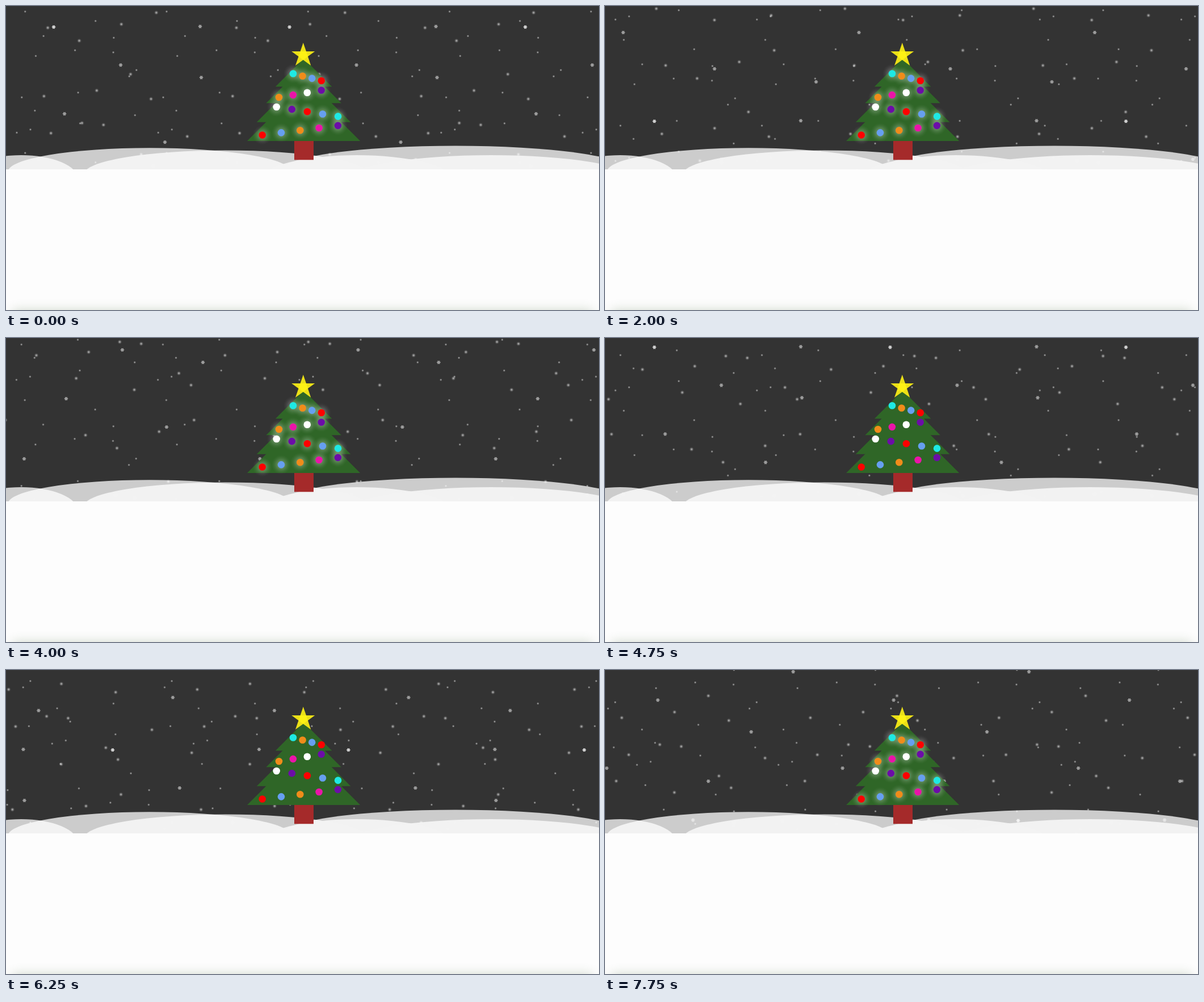
Recreate the animation shown at these times as an HTML page with a canvas. Size 1045 by 536 pixels, loop 8 s.

```html
<!DOCTYPE html>
<html lang="en">
<head>
<meta charset="utf-8">
<title>Snowy tree</title>
<style>
  html, body { margin: 0; width: 100%; height: 100%; overflow: hidden; background: #fdfdfd; }
  canvas { display: block; }
</style>
</head>
<body>
<canvas id="stage" width="1045" height="536"></canvas>
<script>
const ctx = document.getElementById('stage').getContext('2d');
const WIDTH = 1045, HEIGHT = 536, GROUND = 288;
const LOOP = 8000, STEP = 250, CYCLE = 10, START = 4.965;
const UNIT = 0.831; // stage pixels per design pixel
const TAU = Math.PI * 2;

const mod = (a, n) => ((a % n) + n) % n;

function seeded(seed) {
  return () => {
    seed = (seed + 0x6d2b79f5) | 0;
    let t = Math.imul(seed ^ (seed >>> 15), 1 | seed);
    t = (t + Math.imul(t ^ (t >>> 7), 61 | t)) ^ t;
    return ((t ^ (t >>> 14)) >>> 0) / 4294967296;
  };
}

// One flake at a random place in every cell of a grid over the tile
function scatter(seed, tile, grid) {
  const random = seeded(seed), cell = tile / grid;
  return Array.from({ length: grid * grid }, (_, i) =>
    [(i % grid + random()) * cell, (Math.floor(i / grid) + random()) * cell]);
}

// A layer repeats a square tile; "turn" and "end" are its offsets at half and full cycle.
function layer(size, turn, end, draw, flakes) {
  const tile = size * UNIT, scale = v => v * UNIT;
  return { tile, turn: turn.map(scale), end: end.map(scale), draw,
           flakes: flakes || scatter(size, tile, 4) };
}

const brightFlakes = [[87, 40], [345, 39], [205, 107], [347, 129], [106, 193],
                      [283, 243], [32, 299], [193, 363], [372, 386]];
const layers = [
  layer(300, [-100, 150], [-100, 300], smallFlake),
  layer(400, [100, 200], [200, 400], softFlake),
  layer(500, [500, 500], [500, 1000], largeFlake, brightFlakes)
];

// Centre x, top y, horizontal radius
const hills = [
  [27, 263, 99.7], [253, 250.3, 249.3], [387, 254.5, 249.3],
  [792, 246.5, 302], [618, 263, 166], [855, 263, 249.3]
];

const cyan = '#1ee9e4', orange = '#f08c1a', blue = '#669ff0', red = '#ff0000',
      pink = '#ea14a8', white = '#ffffff', purple = '#6c0da8';

// Strings of baubles along straight lines
const garland = (x, y, dx, dy, colors) =>
  colors.map((color, i) => [x + i * dx, y + i * dy, color]);
const baubles = [
  ...garland(506, 119.3, 16.6, 4.15, [cyan, orange, blue, red]),
  ...garland(481, 161, 24.9, -4.15, [orange, pink, white, purple]),
  ...garland(476.7, 178, 27.1, 4.15, [white, purple, red, blue, cyan]),
  ...garland(451.7, 227.5, 33.3, -4.15, [red, blue, orange, pink, purple])
];

function disc(x, y, r, fill) {
  ctx.fillStyle = fill;
  ctx.beginPath();
  ctx.arc(x, y, r, 0, TAU);
  ctx.fill();
}

function polygon(points, fill) {
  ctx.fillStyle = fill;
  ctx.beginPath();
  points.forEach(([x, y]) => ctx.lineTo(x, y));
  ctx.fill();
}

// White light that fades out from alpha at the "core" radius to nothing at r
function softDisc(x, y, core, r, alpha) {
  const g = ctx.createRadialGradient(x, y, core, x, y, r);
  for (let i = 0; i <= 4; i++)
    g.addColorStop(i / 4, `rgba(255,255,255,${alpha * (1 - i / 4) ** 1.5})`);
  disc(x, y, r, g);
}

function smallFlake(x, y) {
  softDisc(x, y, .5, 2.5, .55);
}

function softFlake(x, y) {
  softDisc(x, y, .5, 4, .6);
}

function largeFlake(x, y, index) {
  ctx.fillStyle = `rgba(255,255,255,${index === 0 ? .78 : .52})`;
  ctx.beginPath();
  ctx.arc(x, y, 2.2, 0, TAU);
  for (let i = 0; i < 6; i++) {
    const px = x + 2.4 * Math.cos(i * TAU / 6), py = y + 2.4 * Math.sin(i * TAU / 6);
    ctx.moveTo(px + 1, py);
    ctx.arc(px, py, 1, 0, TAU);
  }
  ctx.fill();
}

function drawSnow(phase) {
  const half = CYCLE / 2;
  for (const { tile, turn, end, draw, flakes } of layers) {
    const [dx, dy] = [0, 1].map(i => phase < half
      ? turn[i] * phase / half
      : turn[i] + (end[i] - turn[i]) * (phase - half) / half);
    flakes.forEach(([fx, fy], index) => {
      const x0 = mod(fx + dx, tile) - tile, y0 = mod(fy + dy, tile) - tile;
      for (let x = x0; x < WIDTH + 5; x += tile)
        for (let y = y0; y < GROUND + 5; y += tile)
          if (x > -5 && y > -5) draw(x, y, index);
    });
  }
}

function drawHills() {
  const height = 50 * UNIT;
  ctx.fillStyle = 'rgba(255,255,255,.75)';
  for (const [x, top, radius] of hills) {
    ctx.beginPath();
    ctx.ellipse(x, top + height, radius, height, 0, 0, TAU);
    ctx.fill();
  }
  // Overlaps never get brighter than two layers of snow
  ctx.globalCompositeOperation = 'darken';
  ctx.fillStyle = '#f3f3f3';
  ctx.fillRect(0, 240, WIDTH, GROUND - 240);
  ctx.globalCompositeOperation = 'source-over';
}

function drawTree(lit) {
  ctx.fillStyle = '#a52a2a';
  ctx.fillRect(508, 238, 34, 33.3);
  for (const [base, half] of [[142.3, 49.8], [171.3, 66.2], [204.8, 82.8], [238, 99.6]])
    polygon([[524.6, base - half], [524.6 + half, base], [524.6 - half, base]], '#2f6627');

  if (lit) for (const [x, y] of baubles) softDisc(x, y, 5, 17, .27);
  for (const [x, y, color] of baubles) disc(x, y, 6.3, color);
}

function drawStar() {
  const fill = 'rgba(255,243,20,.9)';
  const notchL = [518.6, 80], notchR = [529, 80];
  polygon([[523.8, 64.8], notchR, notchL], fill);
  polygon([[503.2, 80], notchR, [537.3, 105]], fill);
  polygon([[544.3, 80], notchL, [510, 105]], fill);
}

function drawGround() {
  ctx.fillStyle = '#fdfdfd';
  ctx.fillRect(0, GROUND, WIDTH, HEIGHT - GROUND);
  ctx.save();
  ctx.shadowColor = 'rgba(60,95,45,.26)';
  ctx.shadowBlur = 20;
  ctx.fillStyle = '#fff';
  ctx.fillRect(12, HEIGHT + 1, WIDTH - 24, 60);
  ctx.restore();
}

function render(time) {
  const seconds = Math.floor((time % LOOP) / STEP) * STEP / 1000;
  const phase = (START + seconds) % CYCLE;

  ctx.fillStyle = '#333';
  ctx.fillRect(0, 0, WIDTH, GROUND);
  drawSnow(phase);
  drawHills();
  drawGround();
  drawTree(phase % 2 < 1);
  drawStar();
}

const began = performance.now();
function tick() {
  render(performance.now() - began);
  requestAnimationFrame(tick);
}
tick();
</script>
</body>
</html>
```
